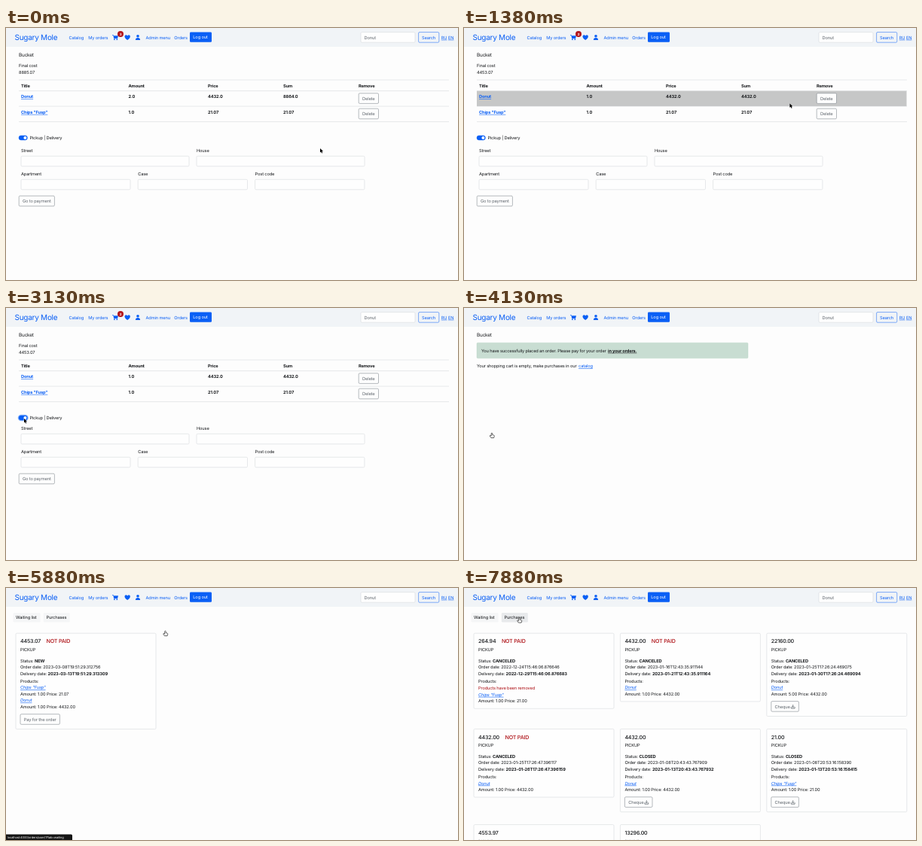
Recreate the animation shown at these times as an HTML page. Size 600 by 335 pixels, loop 8 s.

```html
<!DOCTYPE html>
<html lang="en">
<head>
<meta charset="utf-8">
<title>Shop checkout</title>
<style>
html, body { margin: 0; width: 100%; height: 100%; overflow: hidden; background: #fdfdfd; }
svg { display: block; width: 600px; height: 335px; font-family: Inter, "Open Sans", sans-serif; fill: #16181b; text-rendering: geometricPrecision; }
text { letter-spacing: -.026em; white-space: pre; }
.b { font-weight: 700; }
.m { font-weight: 500; }
.blue { fill: #0a5ff5; }
.u { text-decoration: underline; }
.i { font-style: italic; }
.red { fill: #ad0f14; }
.grey { fill: #60676e; }
.white { fill: #fff; }
.box { fill: #fefefe; stroke: #ced2d6; stroke-width: .5; }
.btn { fill: #fdfdfd; stroke: #6c757d; stroke-width: .5; }
.line { stroke: #cfd3d7; stroke-width: .5; }
.hot .btn { fill: #5c636a; }
.hot text { fill: #fff; }
.row.hot { fill: #c6c7c7; }
.row { fill: none; }
.tab { fill: #f5f6f7; }
.tab.hot { fill: #e8eaec; }
</style>
</head>
<body>
<svg id="stage" viewBox="0 0 600 335"></svg>
<script>
const EM = 5.71, LOOP = 8000, STEP = 125;
const BRAND = 'Sugary Mole', CHIPS = 'Chips "Fusp"';

// Text is placed by its left edge and the middle of its capitals.
const text = (x, y, s, cls = '', size = EM) =>
  `<text x="${x}" y="${y + size * .364}" font-size="${size}" class="${cls}">${s}</text>`;
const rect = (x, y, w, h, cls, r = 1.4) =>
  `<rect x="${x}" y="${y}" width="${w}" height="${h}" rx="${r}" class="${cls}"/>`;
const group = (id, body, cls = '') => `<g id="${id}" class="${cls}">${body}</g>`;
const button = (id, x, y, w, label, tail = '') =>
  group(id, rect(x, y, w, 13.6, 'btn') + text(x + 4.8, y + 6.9, label, 'grey') + tail);
const bold = s => `<tspan class="b">${s}</tspan>`;

function nav() {
  const links = [[83.5, 'Catalog'], [109.3, 'My orders'], [185.5, 'Admin menu'], [223.3, 'Orders']];
  return '<rect width="600" height="25" fill="#f1f4f7"/>' +
    text(11.5, 12.6, BRAND, 'blue', 10) +
    links.map(([x, s]) => text(x, 12.6, s, 'blue')).join('') +
    `<g class="blue">
      <path d="M141 9h1.5l.4 1.2h6.1l-1 3.8h-4.7l-1.1-4.2H141z"/>
      <circle cx="143.9" cy="15.2" r=".9"/><circle cx="147.3" cy="15.2" r=".9"/>
      <path d="M161.2 16C155.5 12.4 157.6 9 159.6 9.2Q160.8 9.4 161.2 10.4Q161.6 9.4 162.8 9.2C164.8 9 166.9 12.4 161.2 16z"/>
      <circle cx="175" cy="10.7" r="1.8"/>
      <path d="M171.9 16Q171.9 12.9 175 12.9T178.1 16z"/>
    </g>` +
    rect(244, 5.4, 29, 13.4, 'blue') + text(248.3, 12.2, 'Log out', 'white') +
    rect(471, 5.6, 72, 13.6, 'box') + text(475.5, 12.6, 'Donut', 'grey') +
    '<rect x="547.6" y="5.6" width="27.2" height="13.6" rx="1.4" fill="none" stroke="#0a5ff5" stroke-width=".5"/>' +
    text(552, 12.6, 'Search', 'blue') +
    text(577.8, 12.6, 'RU', 'blue u') + text(587, 12.6, 'EN', 'blue u');
}

function bucket() {
  const cols = [20, 162.5, 268, 368, 468];
  const cells = (y, list) => list.map((s, i) =>
    text(cols[i], y, s, i || y < 80 ? 'b' : 'b blue u')).join('');
  const lines = [69, 83.6, 104.1, 124.6].map(y => `<path class="line" d="M17 ${y}H588"/>`).join('');
  const before = text(17, 59, '8885.07') + cells(91.2, ['Donut', '2.0', '4432.0', '8864.0']);
  const after = text(17, 59, '4453.07') + cells(91.2, ['Donut', '1.0', '4432.0', '4432.0']);
  return text(17, 35.8, 'Bucket', '', 6.4) + text(17, 50.4, 'Final cost') +
    rect(17, 83.7, 570.5, 20.3, 'row" id="row0', 0) + rect(17, 104.3, 570.5, 20.3, 'row" id="row1', 0) +
    lines + cells(76.6, ['Title', 'Amount', 'Price', 'Sum', 'Remove']) +
    group('before', before) + group('after', after) +
    cells(111.8, [CHIPS, '1.0', '21.07', '21.07']) +
    button('del0', 468.2, 86.8, 26.3, 'Delete') + button('del1', 468.2, 107.2, 26.3, 'Delete') +
    `<rect id="ring" x="16.4" y="142.4" width="12.6" height="7.2" rx="3.6" fill="none" stroke="#8fb8fb" stroke-width="1.4"/>
     <rect id="pill" x="17" y="143.1" width="11.4" height="5.8" rx="2.9" stroke-width=".5"/>
     <circle id="knob" cy="146" r="2"/>` +
    text(31.4, 146, 'Pickup | Delivery') +
    group('form', [[20, 163, 223, 'Street'], [253, 163, 223, 'House'], [20, 194, 145, 'Apartment'],
      [175.2, 194, 145.3, 'Case'], [330.6, 194, 145.3, 'Post code']].map(([x, y, w, s]) =>
      text(x, y, s) + rect(x, y + 7.3, w, 13.5, 'box')).join('')) +
    group('pay', button('payBtn', 17.2, 223.2, 47.2, 'Go to payment'));
}

const placed = () => text(17, 35.8, 'Bucket', '', 6.4) +
  '<rect x="17" y="46.2" width="360" height="20.6" rx="1.4" fill="#c8ddd2" stroke="#b9d5c6" stroke-width=".4"/>' +
  text(23, 56.6, 'You have successfully placed an order. Please pay for your order') +
  text(191, 56.6, 'in your orders.', 'b u') +
  text(17, 77, 'Your shopping cart is empty, make purchases in our') +
  text(152, 77, 'catalog', 'blue u');

// items: [name, amount, price]; action: optional [label, width]
function card(x, y, o) {
  const tx = x + 6;
  let out = '', ly = y + 63.6;
  const due = o.paid ? '' : '<tspan dx="7.5" class="red">NOT PAID</tspan>';
  out += text(tx, y + 10.6, o.cost + due, 'm', 7.1) + text(tx, y + 22, 'PICKUP');
  if (o.status) {
    out += text(tx, y + 36.4, 'Status: ' + bold(o.status)) +
      text(tx, y + 44.8, 'Order date: ' + o.made) +
      text(tx, y + 53.3, 'Delivery date: ' + bold(o.due)) + text(tx, ly, 'Products:');
    if (o.removed) out += text(tx, ly += 9.4, 'Products have been removed', 'red');
    for (const [name, n, price] of o.items) {
      out += text(tx, ly += 8.5, name, 'blue u i') +
        text(tx, ly += 8.6, `Amount: ${n}.00 Price: ${price}`);
    }
    ly += 10;
    if (o.action) {
      const icon = o.paid ? `<path transform="translate(${x + 32.5} ${ly + 4.6})" fill="none" stroke="#60676e" stroke-width=".8"
        d="M0 2.6v1.9h4.8V2.6M2.4-.4v3.4M.9 1.7l1.5 1.5 1.5-1.5"/>` : '';
      out += button('', tx, ly - .3, o.action[1], o.action[0], icon);
      ly += 19.6;
    }
  } else ly = y + 90;
  return rect(x, y, 186, ly - y, 'box') + out;
}

const waiting = () => card(13, 60.2, { cost: '4453.07', status: 'NEW',
  made: '2023-03-08T19:51:29.312756', due: '2023-03-13T19:51:29.313309',
  items: [[CHIPS, 1, '21.07'], ['Donut', 1, '4432.00']], action: ['Pay for the order', 52.4] });

function purchases() {
  const donut = n => [['Donut', n, '4432.00']], chips = [[CHIPS, 1, '21.00']];
  const cheque = ['Cheque', 36.6];
  return [
    { cost: '264.94', status: 'CANCELED', made: '2022-12-24T15:46:06.876646', due: '2022-12-29T15:46:06.876683', removed: true, items: chips },
    { cost: '4432.00', status: 'CANCELED', made: '2023-01-16T12:43:35.911144', due: '2023-01-21T12:43:35.911164', items: donut(1) },
    { cost: '22160.00', status: 'CANCELED', made: '2023-01-25T17:26:24.469075', due: '2023-01-30T17:26:24.469094', items: donut(5), action: cheque, paid: true },
    { cost: '4432.00', status: 'CANCELED', made: '2023-01-25T17:26:47.396117', due: '2023-01-26T17:26:47.396159', items: donut(1) },
    { cost: '4432.00', status: 'CLOSED', made: '2023-01-08T20:43:43.767909', due: '2023-01-13T20:43:43.767932', items: donut(1), action: cheque, paid: true },
    { cost: '21.00', status: 'CLOSED', made: '2023-01-08T20:53:16.158390', due: '2023-01-13T20:53:16.158415', items: chips, action: cheque, paid: true },
    { cost: '4553.97', paid: true }, { cost: '13296.00', paid: true }
  ].map((o, i) => card(13 + i % 3 * 194.4, 60.2 + Math.floor(i / 3) * 127.2, o)).join('');
}

const tabs = () => rect(9.5, 33, 36, 12.6, 'tab') + rect(49.8, 33, 35, 12.6, 'tab" id="tab1') +
  text(13, 39.3, 'Waiting list') + text(53.5, 39.3, 'Purchases');

const bubble = (id, w, s) => group(id,
  `<path d="M0 327.4H${w - 1.5}q1.5 0 1.5 1.5V335H0z" fill="#151515"/>` + text(1.8, 331.4, s, 'white', 4));

document.getElementById('stage').innerHTML = nav() +
  group('badge', '<circle cx="152" cy="8" r="4" fill="#b3161b"/>' +
    '<text id="count" x="152" y="9.6" font-size="4.4" text-anchor="middle" class="white b"></text>') +
  group('bucket', bucket()) + group('placed', placed()) + group('tabs', tabs()) +
  group('waiting', waiting()) + group('purchases', purchases()) +
  bubble('loading', 200, 'Waiting for mediasave.ru...') +
  bubble('urlWaiting', 88, 'localhost:4000/orders/user/1?tab=waiting') +
  bubble('urlPurchases', 92, 'localhost:4000/orders/user/1?tab=purchases') +
  `<g id="cursor">
    <path id="arrow" d="M0 0V5.6L1.3 4.5L2.2 6.5L3.2 6.1L2.3 4.1H4z" fill="#000" stroke="#fff" stroke-width=".6" paint-order="stroke"/>
    <path id="hand" d="M-.8.6Q0-.6.7.6V2.6L2.7 3.1Q3.4 3.5 3.2 4.6L2.6 6.6H-1.1L-2.8 4Q-2.6 3-1.6 3.5L-.8 4.1z" fill="#fff" stroke="#222" stroke-width=".7"/>
  </g>`;

const el = {};
document.querySelectorAll('[id]').forEach(e => { el[e.id] = e; });

// Pointer stops: time, x, y
const path = [[0, 417, 160], [625, 480, 94], [1250, 480, 94], [1875, 22, 154], [2000, 22, 154],
  [2250, 24, 147], [3250, 24, 147], [3625, 37, 166], [4625, 37, 166], [5000, 192, 62],
  [5125, 192, 62], [5500, 211.5, 57], [5875, 211.5, 57], [6500, 73.5, 39.5], [LOOP, 73.5, 39.5]];

function pointer(t) {
  const i = path.findIndex(p => p[0] > t);
  const [t0, x0, y0] = path[i - 1], [t1, x1, y1] = path[i];
  const p = (t - t0) / (t1 - t0), k = p * p * (3 - 2 * p);
  return [x0 + (x1 - x0) * k, y0 + (y1 - y0) * k];
}

const show = (id, on) => { el[id].style.display = on ? '' : 'none'; };
const hot = (id, on) => el[id].classList.toggle('hot', on);

function render(now) {
  const t = Math.floor(now % LOOP / STEP) * STEP;
  const within = (a, b) => t >= a && t < b;
  const [x, y] = pointer(t);
  const over = (x0, y0, x1, y1) => x >= x0 && x < x1 && y >= y0 && y < y1;

  show('bucket', t < 4125);
  show('placed', within(4125, 5750));
  show('tabs', t >= 5750);
  show('waiting', within(5750, 7000));
  show('purchases', t >= 7000);
  show('badge', t < 4125);
  el.count.textContent = t < 1125 ? 3 : 2;
  show('before', t < 1125);
  show('after', t >= 1125);

  const on = t < 2375 || within(2875, 3250), lift = t < 2375 ? 0 : -3;
  show('form', on);
  el.form.setAttribute('transform', `translate(0 ${lift})`);
  el.pay.setAttribute('transform', `translate(0 ${on ? lift : -63})`);
  show('ring', t >= 2375);
  el.pill.setAttribute('fill', on ? '#0a5ff5' : '#fff');
  el.pill.setAttribute('stroke', on ? '#0a5ff5' : '#86b7fe');
  el.knob.setAttribute('cx', on ? 25.4 : 20);
  el.knob.setAttribute('fill', on ? '#fff' : '#86b7fe');

  hot('row0', over(17, 84, 588, 104));
  hot('row1', over(17, 104, 588, 124.5));
  hot('del0', over(468, 87, 494.5, 100.5));
  hot('del1', over(468, 107, 494.5, 121));
  hot('payBtn', !on && over(17, 160, 64.5, 174));
  hot('tab1', over(50, 33, 85, 45.5));

  show('loading', within(750, 1125));
  show('urlWaiting', within(5625, 6125));
  show('urlPurchases', within(6500, 7375));

  const hand = within(500, 1375) || within(3625, 4250) || within(5375, 6000) || t >= 6375;
  show('hand', hand);
  show('arrow', !hand);
  el.cursor.setAttribute('transform', `translate(${x} ${y})`);
}

const start = performance.now();
function tick() {
  render(performance.now() - start);
  requestAnimationFrame(tick);
}
tick();
</script>
</body>
</html>
```
